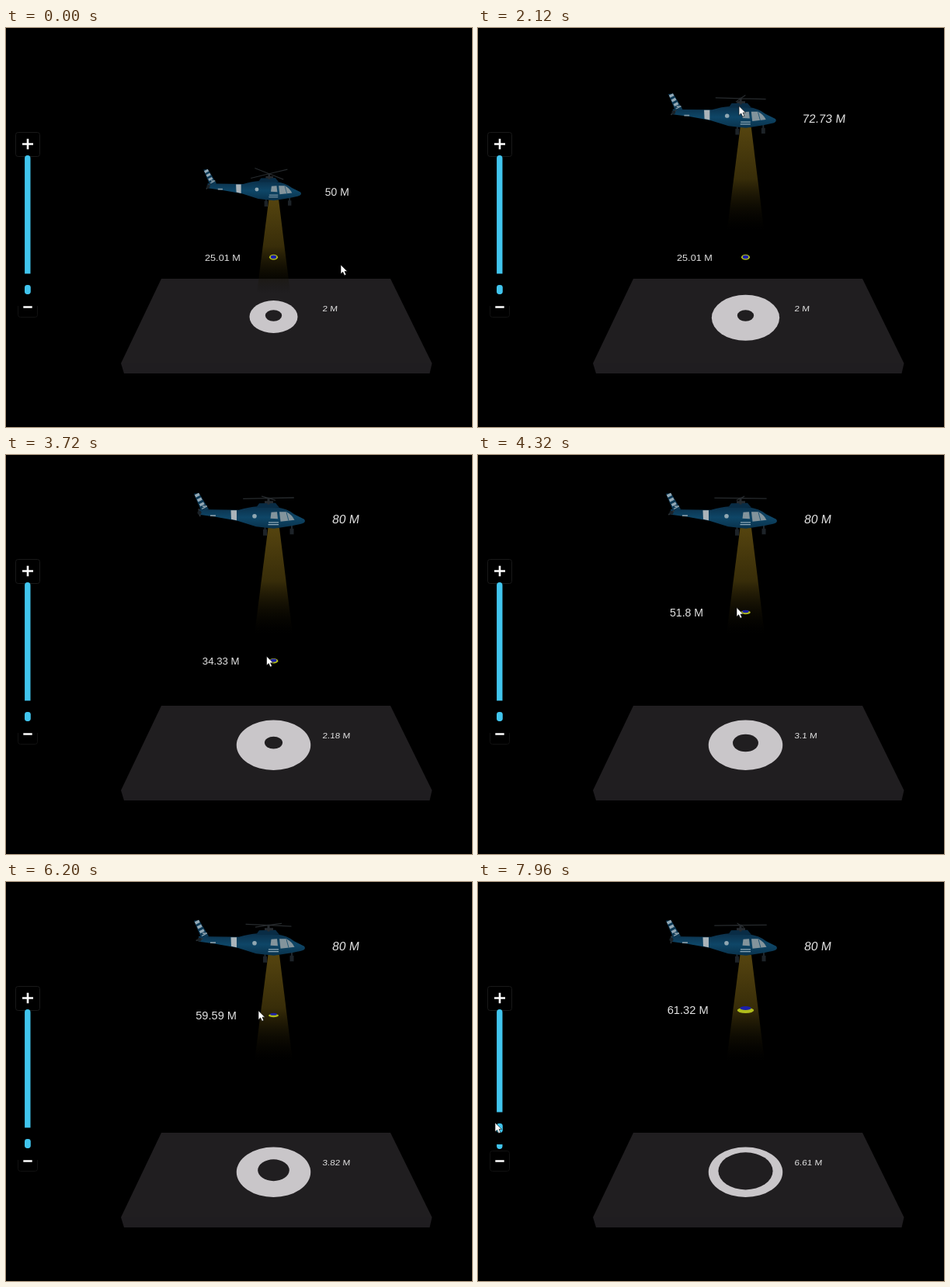
These frames come from a looping animation (600 by 514 pixels, 8000 ms). An HTML page:

```html
<!DOCTYPE html>
<html lang="en">
<head>
<meta charset="utf-8">
<style>
  html, body { margin: 0; width: 100%; height: 100%; overflow: hidden; background: #000; }
  svg { display: block; width: 600px; height: 514px; }
  text { font-family: "Liberation Sans", Arial, sans-serif; fill: #e2e2e2; }
</style>
</head>
<body>
<svg viewBox="0 0 600 514">
  <defs>
    <linearGradient id="light" x1="0" y1="0" x2="0" y2="1">
      <stop offset="0" stop-color="#55440f"/>
      <stop offset=".5" stop-color="#382d09"/>
      <stop offset="1" stop-color="#0a0801" stop-opacity="0"/>
    </linearGradient>
    <linearGradient id="paint" x1="0" y1="0" x2="0" y2="1">
      <stop offset="0" stop-color="#0b304a"/>
      <stop offset=".5" stop-color="#0e4667"/>
      <stop offset="1" stop-color="#09324c"/>
    </linearGradient>
  </defs>
  <rect width="600" height="514"/>

  <g fill="none" stroke="#191919">
    <rect x="12.5" y="134.5" width="31" height="31" rx="3"/>
    <rect x="15.5" y="346.5" width="25" height="26" rx="3" stroke="#111"/>
  </g>
  <rect x="24.1" y="164" width="7.4" height="180" rx="3.7" fill="#41c5ee"/>
  <g id="thumb">
    <rect x="14" y="-20.5" width="28" height="41.5"/>
    <rect x="24" y="-6" width="7.8" height="12" rx="3.4" fill="#41c5ee"/>
  </g>
  <path d="M21 149.5H35M28 142.7V156.3M22.3 359.5H33.7" stroke="#fff" stroke-width="2.6"/>

  <path d="M200 323H495L548.5 432H148Z" fill="#201e20"/>
  <path d="M148 432H548.5L545.5 445H152Z" fill="#1f1d20"/>
  <ellipse id="pool" cx="344.5" fill="#c9c6c9"/>
  <ellipse id="shadow" cx="344.5" fill="#201e20"/>

  <g id="heli">
    <path d="M-7 11H7.500L24.500 148H-24.500Z" fill="url(#light)"/>
    <g transform="translate(-344.5 -84)">
      <path d="M333.500 93V100M368 92V99" stroke="#1f282f" stroke-width="2"/>
      <path d="M333.500 97V105M368 96V103.500" stroke="#1d2328" stroke-width="5"/>
      <path d="M242 51L248.500 50.500L261 71L252 75Z" fill="#0e3a56"/>
      <path d="M245.500 51.500L255 70" stroke="#93a8b5" stroke-width="6" stroke-dasharray="3.500 3"/>
      <path d="M248 71L262 71.500L300 72Q313 68 324 67.500L348 68.500Q362 70 371 77.500L384 84Q387 88 380 90L368 92.500L345 96L322 93.500L298 86L270 81L248 78Z" fill="url(#paint)"/>
      <path d="M322 69L326 63.500L347 63L352 69Z" fill="#092c45"/>
      <path d="M289.500 72.500H297V85.500L290 84Z" fill="#aab4ba"/>
      <path d="M341.500 75L349 74.500L350 83.500L340.500 83ZM352 74.500H361Q368 78 371.500 85L353.500 87Z" fill="#83949c"/>
      <path d="M361 75L364 86" stroke="#245775"/>
      <circle cx="320" cy="80" r="2.800" fill="#90a7b2"/>
      <path d="M338 88.200H351M337.500 91H351" stroke="#8fa9b7" stroke-width="1.300"/>
      <path d="M263 79.500H270M253 67.500H259" stroke="#8296a2" stroke-width="1.800"/>
      <path id="tailRotor" stroke="#2b3237" stroke-width="1.800"/>
      <circle cx="249" cy="75.500" r="2.500" fill="#1a2127"/>
      <path d="M338 56V65M333 62H344" stroke="#262b30" stroke-width="3"/>
      <path id="rotor" stroke="#272b2e" stroke-width="1.300"/>
    </g>
  </g>

  <g id="disc">
    <ellipse id="rim" fill="#b0bd1c"/>
    <ellipse id="dome" fill="#1b1fa8"/>
  </g>

  <text id="heliText"></text>
  <text id="discText"></text>
  <text id="shadowText"></text>

  <path id="cursor" d="M0 0V11.800L2.700 9.300L4.700 13.700L6.900 12.700L5 8.500H8.500Z" fill="#fff" stroke="#000" stroke-width=".6"/>
</svg>
<script>
const LOOP = 8000, STEP = 40, CENTER = 344.5, GROUND = 25;
const parts = {};
document.querySelectorAll("[id]").forEach(el => parts[el.id] = el);

const set = (el, attrs) => { for (const k in attrs) el.setAttribute(k, attrs[k]); };
const span = (t, from, to) => Math.min(1, Math.max(0, (t - from) / (to - from)));
const smooth = u => u * u * (3 - 2 * u);
const metres = v => +v.toFixed(2) + " M";

// Motion of the three dragged things
const heliHeight = t => 50 + 30 * span(t, 900, 2405.5) ** 1.3198;
const discHeight = t => 25.01 + 48.34 * span(t, 3400, 5060)
  - 13.76 * span(t, 5060, 6200) + 1.73 * span(t, 6200, 6360);
const thumbY = t => 337 - 34.5 * span(t, 6880, 7720) + 14.5 * span(t, 7720, 7960);

// Perspective: higher things are nearer to the camera
const screenY = h => 296 - 3.135 * (h - GROUND) / (1 - 0.0036 * (h - GROUND));
const heliY = h => screenY(h) + 1.7;
const fontAt = h => 12.7 + 0.055 * (h - GROUND);
const scaleAt = h => 1 - 0.004 * (80 - h);

function label(el, value, x, y, size, skew, squash) {
  el.textContent = metres(value);
  set(el, { "font-size": size, transform: `translate(${x} ${y + size * 0.35 * squash}) skewX(${skew}) scale(1 ${squash})` });
}

function blades(cx, cy, rx, ry, angle, count) {
  let d = "";
  for (let i = 0; i < count; i++) {
    const a = angle + i * 2 * Math.PI / count;
    d += `M${cx} ${cy}L${cx + rx * Math.cos(a)} ${cy - ry * Math.sin(a)}`;
  }
  return d;
}

function drawHeli(t) {
  const h = heliHeight(t), rise = h - 50, y = heliY(h);
  const spin = (38 + t * 1.76) * Math.PI / 180;
  const poolSize = 31 + 0.557 * rise;
  set(parts.heli, { transform: `translate(${CENTER} ${y}) scale(${scaleAt(h)})` });
  set(parts.rotor, { d: blades(338, 57, 34, 34 * (0.31 - 0.0077 * rise), spin, 4) });
  set(parts.tailRotor, { d: blades(249, 75.5, 4.5, 5, spin * 1.3, 2) });
  set(parts.pool, { cy: 372 + 0.057 * rise, rx: poolSize, ry: poolSize * 0.675 });
  label(parts.heliText, h, 410.5 + 0.3 * rise, y, fontAt(h), -2 - 0.2 * rise, 1);
}

function drawDisc(t) {
  const h = discHeight(t), rise = h - GROUND, y = screenY(h);
  const size = 1 + 0.032 * (337 - thumbY(t));
  const rx = 7.1 * scaleAt(h) * size;
  const tilt = 0.63 - 0.0082 * rise;
  const lift = rx * (0.05 + 0.006 * rise);
  set(parts.disc, { transform: `translate(${CENTER} ${y - 0.8})` });
  set(parts.rim, { cy: lift * 0.4, rx, ry: rx * tilt });
  set(parts.dome, { cy: -lift * 0.6, rx: rx * 0.67, ry: rx * tilt * 0.68 });
  label(parts.discText, h, 256 - 0.34 * rise, y, fontAt(h), 0, Math.min(1, 0.92 + 0.003 * rise));

  const spread = Math.max(2, 128 / (93.1 - h)) * size;
  set(parts.shadow, { cy: 370.5 + 0.4 * (spread - 2), rx: 5.31 * spread, ry: 3.64 * spread });
  label(parts.shadowText, spread, 407.3, 361.5, 11.7, -5, 0.86);
}

// Places where the pointer holds what it drags
function heliGrip(t) {
  const h = heliHeight(t);
  return [331 + 0.27 * (h - 54), heliY(h) - 8 - 0.45 * (h - 54)];
}
const discGrip = t => [333 - 0.00426 * (t - 4320), screenY(discHeight(t)) - 6.5];
const thumbGrip = t => [22, thumbY(t) - 7];

// Each leg glides from wherever the pointer was to its goal, then stays with it
const legs = [
  { from: 0, to: 280, goal: () => [32, 342] },
  { from: 280, to: 480, goal: () => [30, 146] },
  { from: 480, to: 880, goal: heliGrip },
  { from: 2440, to: 2960, goal: () => [360, 217] },
  { from: 2960, to: 3360, goal: discGrip },
  { from: 6400, to: 6880, goal: thumbGrip }
];

function drawCursor(t) {
  const [x, y] = legs.reduce((pos, leg) => {
    const u = smooth(span(t, leg.from, leg.to)), goal = leg.goal(t);
    return pos.map((p, i) => p + (goal[i] - p) * u);
  }, [431, 305]);
  set(parts.cursor, { transform: `translate(${x} ${y})` });
}

const start = performance.now();
function tick() {
  const now = (performance.now() - start) % LOOP;
  const t = Math.floor(now / STEP) * STEP;
  drawHeli(t);
  drawDisc(t);
  set(parts.thumb, { transform: `translate(0 ${thumbY(t)})` });
  drawCursor(t);
  requestAnimationFrame(tick);
}
tick();
</script>
</body>
</html>
```
